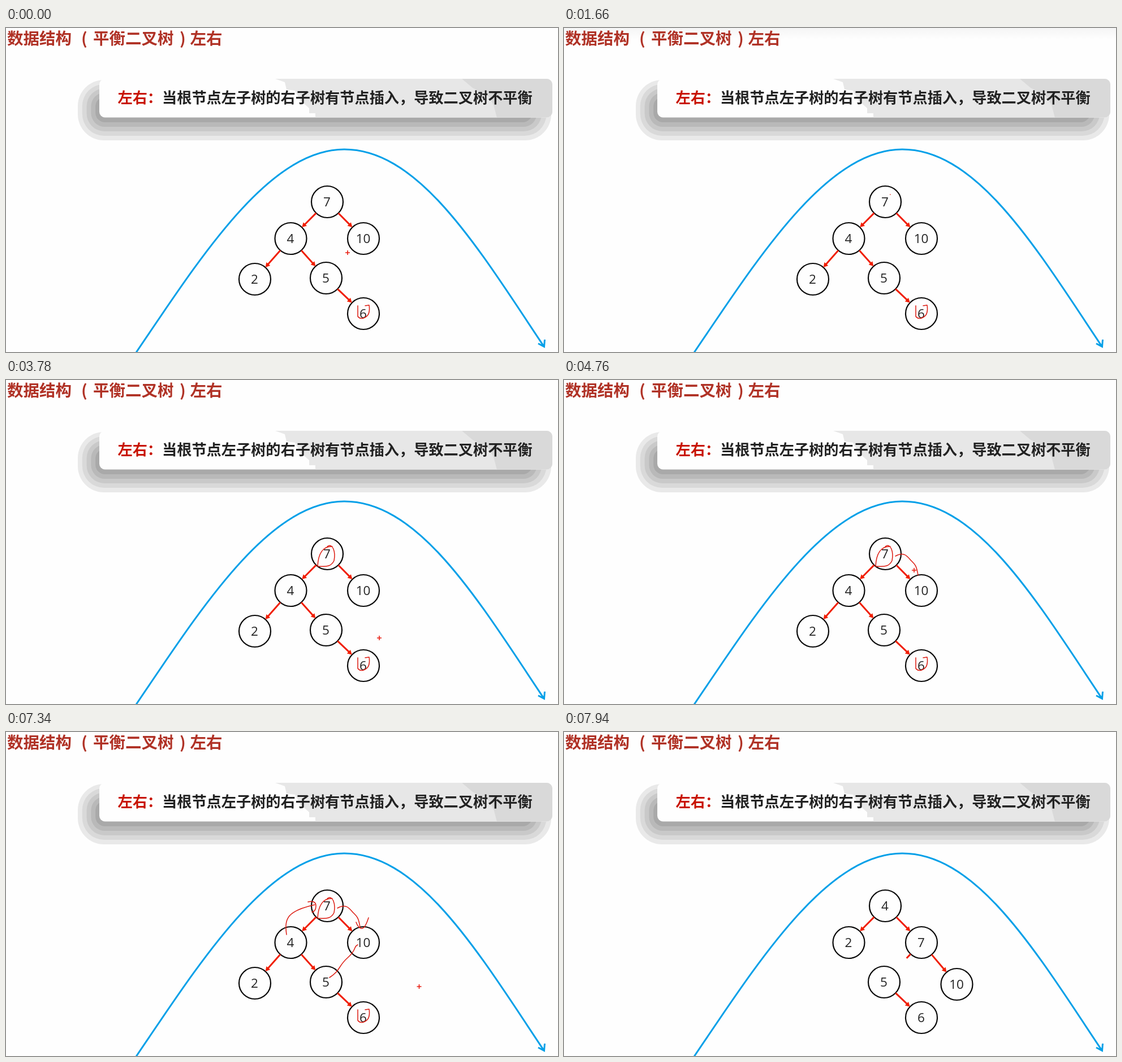
Write an HTML page that moves like this. It is 976 by 574 pixels and loops after 7.99 s.

```html
<!DOCTYPE html>
<html lang="zh">
<head>
<meta charset="utf-8">
<style>
  html, body { margin: 0; width: 100%; height: 100%; overflow: hidden; background: #fefefe; }
  svg { display: block; }
  .cjk { font-family: "Noto Sans CJK SC", "Noto Sans CJK", sans-serif; font-weight: 700; }
  .title { font-size: 28.5px; fill: #b03226; }
  .banner { font-size: 26.2px; fill: #222; }
  .node circle { fill: #fefefe; stroke: #080808; stroke-width: 2.2; }
  .node text { font: 22.5px "Open Sans", "Noto Sans", sans-serif; fill: #222; text-anchor: middle; }
  .arrow { fill: #f01e00; }
  .ink { stroke: #dc1a10; stroke-width: 1.5; stroke-linecap: round; stroke-linejoin: round; }
</style>
</head>
<body>
<svg width="976" height="574" viewBox="0 0 976 574">
  <defs>
    <linearGradient id="haze" x2="0" y2="1">
      <stop stop-color="#f5f5f5"/><stop offset="1" stop-color="#fefefe"/>
    </linearGradient>
    <clipPath id="card"><rect x="165" y="90" width="801" height="68.5" rx="10"/></clipPath>
  </defs>
  <rect id="topHaze" width="976" height="20" fill="url(#haze)"/>
  <g class="cjk title">
    <text x="2" y="29">数据结构</text><text x="133" y="29">(</text>
    <text x="154" y="29">平衡二叉树</text><text x="307" y="29">)</text>
    <text x="325.5" y="29">左右</text>
  </g>
  <g id="shadow"></g>
  <g clip-path="url(#card)">
    <path fill="#fefefe" d="M165 90H966V159H165Z"/>
    <path fill="#e7e7e7" d="M476 90L493 96 496 109 511 111 520 128 536 142V151H547V159H966V90Z"/>
    <path fill="#d9d9d9" d="M806 90L825 106 853 121 862 136 868 159H966V90Z"/>
  </g>
  <text class="cjk banner" x="197.5" y="133"><tspan fill="#c81400">左右：</tspan>当根节点左子树的右子树有节点插入，导致二叉树不平衡</text>
  <path fill="none" stroke="#05a0e8" stroke-width="3" d="M230 575C345 405 465 215 598 215S835 390 951 564M941 559L951.5 564.5 952.5 552"/>
  <g id="nodes"></g>
  <g id="arrows"></g>
  <g id="inks" fill="none"></g>
  <path id="cursor" d="M-4 0H4M0 -4V4" stroke="#e81c10" stroke-width="1.6"/>
</svg>
<script>
const LOOP = 7990, CLEAR = 7390, SETTLED = 7850, WIPE = 7890, RADIUS = 28;
const $ = id => document.getElementById(id);
const clamp = v => Math.max(0, Math.min(1, v));
const mix = (a, b, p) => a + (b - a) * p;
const show = (el, on) => el.setAttribute('visibility', on ? 'visible' : 'hidden');

function add(parent, tag, attrs) {
  const el = document.createElementNS('http://www.w3.org/2000/svg', tag);
  for (const key in attrs) el.setAttribute(key, attrs[key]);
  return parent.appendChild(el);
}

for (let i = 0; i < 5; i++) {
  const grey = 233 - 16 * i;
  add($('shadow'), 'rect', {
    x: 127 + 7.8 * i, y: 92 + 7.5 * i, width: 837 - 16.2 * i, height: 107 - 15.5 * i,
    rx: 46 - 7.3 * i, fill: `rgb(${grey},${grey},${grey})`
  });
}

// Tree: places, the place each label starts and ends at, and the links
const places = {
  top: [568, 308], left: [503.5, 373], right: [632, 373], farLeft: [440, 445],
  middle: [566, 443], low: [632, 506], farRight: [694.5, 447]
};
const nodes = [
  ['7', 'top', 'right'], ['4', 'left', 'top'], ['10', 'right', 'farRight'],
  ['2', 'farLeft', 'left'], ['5', 'middle', 'middle'], ['6', 'low', 'low']
].map(([label, start, end]) => {
  const el = add($('nodes'), 'g', { class: 'node' });
  add(el, 'circle', { r: RADIUS });
  add(el, 'text', { x: -0.5, y: 7.5 }).textContent = label;
  return { el, start: places[start], end: places[end] };
});

function link(from, to, since = 0, until = LOOP) {
  const [x, y] = places[from], [tx, ty] = places[to];
  const angle = Math.atan2(ty - y, tx - x) * 180 / Math.PI;
  const len = Math.hypot(tx - x, ty - y) - 2 * RADIUS;
  const el = add($('arrows'), 'path', {
    class: 'arrow', transform: `translate(${x} ${y}) rotate(${angle}) translate(${RADIUS} 0)`,
    d: `M0-1.5H${len - 8}V-4.5L${len} 0 ${len - 8} 4.5V1.5H0Z`
  });
  return { el, len, since, until };
}
const links = [
  link('top', 'left'), link('top', 'right'), link('middle', 'low'),
  link('left', 'farLeft', 0, CLEAR), link('left', 'middle', 0, CLEAR),
  link('right', 'farRight', SETTLED)
];
const wiped = link('right', 'middle');

// Pointer: strokes leave ink, hops only move the cursor on from where it was
const gestures = [];
function gesture(start, end, d, inked) {
  const el = add($('inks'), 'path', { d, class: inked ? 'ink' : '' });
  gestures.push({ start, end, el, inked, len: el.getTotalLength() });
}
const stroke = (start, end, d) => gesture(start, end, d, true);
function hop(start, end, x, y) {
  const { el, len } = gestures.at(-1), from = el.getPointAtLength(len);
  gesture(start, end, `M${from.x} ${from.y}L${x} ${y}`, false);
}
stroke(-2, -1, 'M622 492V511Q626 516 632 514Q645 510 642 491L635 492');
hop(-1, 0, 604, 398);
hop(770, 1480, 577, 295);
stroke(1660, 2230, 'M577 295C560 294 552 308 551 330C562 330 574 333 580 320C583 305 578 288 568 295');
hop(2370, 2560, 594, 372);
hop(3630, 3780, 660, 457);
hop(3950, 4390, 586, 312);
stroke(4480, 4700, 'M586 312C600 304 606 311 612 318S623 325 626 346');
hop(4700, 4760, 619, 337);
stroke(4810, 5180, 'M619 337Q623 348 629 348T641 329');
hop(5280, 5390, 496, 359);
stroke(5390, 5580, 'M496 359C492 330 497 317 546 306');
hop(5580, 5640, 534, 301);
stroke(5640, 5760, 'M534 301Q548 298 548 308T541 319');
hop(5760, 5890, 571, 447);
hop(6210, 6290, 572, 435);
stroke(6290, 6600, 'M572 435C592 422 587 415 604 400S614 380 622 377');
hop(6600, 6780, 661, 331);
hop(6780, 6960, 633, 401);
hop(7010, 7100, 730.5, 451);

function draw(t) {
  show($('topHaze'), t >= 200 && t < 3650);

  const p = clamp((t - CLEAR) / (SETTLED - CLEAR)), eased = p * p * (3 - 2 * p);
  for (const { el, start, end } of nodes)
    el.setAttribute('transform', `translate(${start.map((v, i) => mix(v, end[i], eased))})`);
  for (const { el, since, until } of links) show(el, t >= since && t < until);

  const reach = wiped.len * clamp((t - WIPE) / 200);
  wiped.el.setAttribute('d', `M0-1.5H${reach}V1.5H0Z`);

  let drawing = false;
  for (const { start, end, el, inked, len } of gestures) {
    if (t < start) { show(el, false); continue; }
    const done = len * clamp((t - start) / (end - start));
    const { x, y } = el.getPointAtLength(done);
    $('cursor').setAttribute('transform', `translate(${x} ${y})`);
    el.setAttribute('stroke-dasharray', `${done} ${2 * len}`);
    show(el, t < CLEAR);
    drawing = inked && t < end;
  }
  show($('cursor'), !drawing && t < CLEAR);
}

const began = performance.now();
function frame() {
  draw((performance.now() - began) % LOOP);
  requestAnimationFrame(frame);
}
frame();
</script>
</body>
</html>
```
